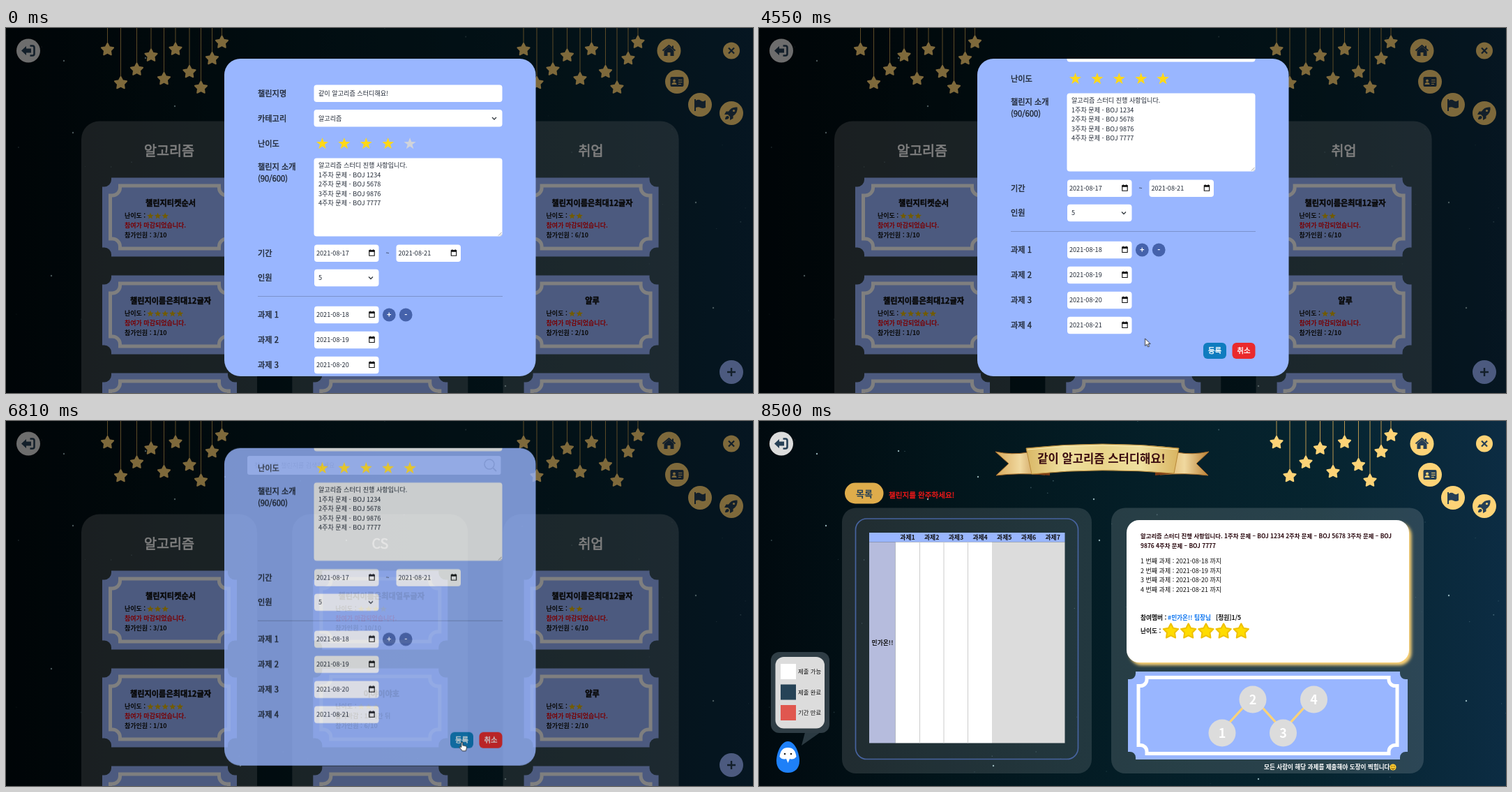
Recreate the animation shown at these times as an HTML page. Size 1071 by 523 pixels, loop 8570 ms.

```html
<!DOCTYPE html>
<html lang="ko">
<head>
<meta charset="utf-8">
<title>챌린지</title>
<style>
html, body { margin: 0; width: 100%; height: 100%; overflow: hidden; background: #000; }
svg { display: block; width: 1071px; height: 523px; }
text { font-family: "Noto Sans CJK KR", "Noto Sans CJK", "Noto Sans", sans-serif; white-space: pre; }
.b { font-weight: 700; }
.h { font-weight: 700; stroke: #111; stroke-width: .035em; }
.m { stroke: currentColor; stroke-width: .035em; }
.mid { text-anchor: middle; }
</style>
</head>
<body>
<svg id="stage" viewBox="0 0 1071 523"></svg>
<script>
const LOOP = 8570;
const GOLD = '#fdd377', NAVY = '#263f55', BLUE = '#99b6ff', GREY = '#dcdcdc';

// Drawing helpers
const times = (n, f) => Array.from({ length: n }, (_, i) => f(i)).join('');
const rect = (x, y, w, h, fill, rx = 0, more = '') =>
  `<rect x="${x}" y="${y}" width="${w}" height="${h}" rx="${rx}" fill="${fill}" ${more}/>`;
const dot = (x, y, r, fill, more = '') => `<circle cx="${x}" cy="${y}" r="${r}" fill="${fill}" ${more}/>`;
const path = (d, fill, more = '') => `<path d="${d}" fill="${fill}" ${more}/>`;
const line = (d, color, w, more = '') => path(d, 'none', `stroke="${color}" stroke-width="${w}" ${more}`);
const at = (x, y, body) => `<g transform="translate(${x} ${y})">${body}</g>`;
// y is the visual middle of the line
const text = (x, y, size, str, fill = '#111', cls = '') =>
  `<text x="${x}" y="${(y + size * 0.36).toFixed(2)}" font-size="${size}" fill="${fill}" color="${fill}" class="${cls}">${str}</text>`;

function star(x, y, r, fill, ratio = 0.4, more = '') {
  const pts = times(10, i => {
    const a = (i / 5 - 0.5) * Math.PI, d = i % 2 ? r * ratio : r;
    return `${(x + d * Math.cos(a)).toFixed(2)},${(y + d * Math.sin(a)).toFixed(2)} `;
  });
  return `<polygon points="${pts}" fill="${fill}" ${more}/>`;
}
const softStar = (x, y, r, fill, edge = fill) =>
  star(x, y, r, fill, 0.52, `stroke="${edge}" stroke-width="2" stroke-linejoin="round"`);

// Rectangle with stepped, concave corners
function notched(x, y, w, h, r, s) {
  const q = r - s, arc = (dx, dy) => `a${q} ${q} 0 0 0 ${dx} ${dy}`;
  return `M${x + r} ${y}H${x + w - r}v${s}${arc(q, q)}h${s}V${y + h - r}h${-s}${arc(-q, q)}v${s}` +
    `H${x + r}v${-s}${arc(-q, -q)}h${-s}V${y + r}h${s}${arc(q, -q)}Z`;
}
const ticket = (x, y, w, h, dx, dy, r) =>
  path(notched(x, y, w, h, r, 3), BLUE) +
  line(notched(x + dx, y + dy, w - 2 * dx, h - 2 * dy, r + 1, 3), '#fff', 5);

// Shared scenery
function sky() {
  let seed = 11;
  const rnd = () => (seed = seed * 16807 % 2147483647) / 2147483647;
  const faint = times(70, () => dot((rnd() * 1071).toFixed(1), (rnd() * 523).toFixed(1),
    (0.4 + rnd() * 0.6).toFixed(2), '#9fc4cc', `opacity="${(0.1 + rnd() * 0.3).toFixed(2)}"`));
  const bright = [[96, 150], [242, 112], [65, 355], [83, 47], [314, 80], [488, 171], [480, 112], [989, 250],
    [1014, 401], [716, 513], [336, 494], [200, 43]]
    .map(([x, y]) => dot(x, y, 1.2, '#bfe0e6', 'opacity=".75"')).join('');
  return rect(0, 0, 1071, 523, 'url(#sky)') + faint + bright;
}
const hanging = x0 => [[0, 31], [19, 79], [42, 59.5], [62.5, 39.5], [81, 73], [97.5, 30.5], [117.5, 63], [134, 85.5],
  [150, 44], [164, 20.5]].map(([dx, y]) =>
  line(`M${x0 + dx} 0V${y - 8}`, '#b8954f', 1) + softStar(x0 + dx, y, 9, GOLD)).join('');

const icons = {
  exit: path('M-10 0L-3-6.500V-3H4V3H-3V6.500Z', NAVY) + line('M2.500-7H6q2.500 0 2.500 2.500V4.500q0 2.500-2.500 2.500H2.500', NAVY, 2.6),
  home: path('M-7 0L0-6 7 0V7.500H2V2.500H-2V7.500H-7Z', NAVY) + line('M-9 0L0-7.500 9 0M5.500-7V-3', NAVY, 2),
  card: rect(-9.5, -7, 19, 14, NAVY, 2) + dot(-4, -1.5, 2, GOLD) + path('M-7.500 4q0-3 3.500-3t3.500 3z', GOLD) +
    line('M2-2.500H7.500M2 .5H7.500M2 3.500H6', GOLD, 1.2),
  flag: line('M-7-8V9', NAVY, 2) + path('M-6-6q4-2.500 7 0t7-.5V4q-4 2-7 .3T-6 4Z', NAVY),
  rocket: path('M8.500-8.500q1 8-6 12.500V7.500L-2 10V5L-5 2H-10L-7.500-2.500H-4Q0-9.500 8.500-8.500Z', NAVY) +
    path('M-6 4q3 0 2.500 3-1.500 2.500-5.500 2 0-4 3-5Z', NAVY) + dot(3.5, -3.5, 1.6, GOLD)
};
const nav = () =>
  at(32, 32.5, dot(0, 0, 17, GREY) + icons.exit) +
  at(950.5, 32.5, dot(0, 0, 17, GOLD) + icons.home) +
  at(962, 77, dot(0, 0, 17, GOLD) + icons.card) +
  at(995, 110, dot(0, 0, 17, GOLD) + icons.flag) +
  at(1040, 122, dot(0, 0, 17, GOLD) + icons.rocket) +
  at(1040, 32.5, dot(0, 0, 12, GOLD) + line('M-4-4L4 4M4-4L-4 4', NAVY, 2.2));

// Challenge list
const CLOSED = '참여가 마감되었습니다.';
const columns = [
  ['알고리즘', ['챌린지티켓순서', 3, CLOSED, '3/10'], ['챌린지이름은최대12글자', 5, CLOSED, '1/10']],
  ['CS', ['챌린지이름은최대열두글자', 4, CLOSED, '10/10'], ['이야이야호', 3, '참가마감 : 18시간 뒤', '6/10']],
  ['취업', ['챌린지이름은최대12글자', 2, CLOSED, '6/10'], ['얄루', 2, CLOSED, '2/10']]
];
function listTicket([name, level, state, people], x, y) {
  return text(x + 128, y + 36, 11.2, name, '#111', 'h mid') +
    text(x + 62, y + 54.5, 9, '난이도 :', '#111', 'b') +
    times(level, i => star(x + 99 + i * 10.6, y + 55, 5, '#e6b800', 0.42)) +
    text(x + 62, y + 68.5, 9, state, state === CLOSED ? '#f00008' : '#111', 'b') +
    text(x + 62, y + 82, 9, '참가인원 : ' + people, '#111', 'b');
}
const listPage = () => sky() + hanging(145.5) + hanging(742) + nav() +
  rect(346, 50, 363.5, 27, '#fff', 3) + text(356, 63.5, 9, '찾고 싶은 챌린지를 검색하세요', '#999') +
  line('M698.500 67.500L703 72', '#555', 2) + dot(693, 62, 7, 'none', 'stroke="#555" stroke-width="1.600"') +
  columns.map(([title, ...cards], c) => {
    const x = 108 + c * 302.3;
    return rect(x, 133.5, 252, 420, '#fff', 26, 'opacity=".2"') +
      text(x + 126, 176, 19.6, title, '#fff', 'm mid') +
      times(3, i => ticket(x + 30, 214.5 + i * 140, 193, 113, 11.5, 11.5, 13)) +
      cards.map((card, i) => listTicket(card, x, 214.5 + i * 140)).join('');
  }).join('') +
  at(1040, 493, dot(0, 0, 17, BLUE) + line('M-6 0H6M0-6V6', NAVY, 2.4));

// Challenge detail
const MEMBER = '민가온!!';
const ribbon = () =>
  path('M339 44Q362 49 386 45L410 77Q372 74 340 78L358 61Z', 'url(#tail)', 'stroke="#a9702c"') +
  path('M645 44Q622 49 599 45L575 77Q612 74 644 78L627 61Z', 'url(#tail)', 'stroke="#a9702c"') +
  path('M391 76L417 73 417 78Z M595 75L568 73 568 78Z', '#7d3c16') +
  path('M383 39Q492 27 602 39L595 75Q492 66 391 76Z', 'url(#gold)', 'stroke="#b98a3a"') +
  line('M385 41Q492 29 600 41', '#f6e8ae', 1) +
  text(491, 54, 16.6, '같이 알고리즘 스터디해요!', '#3a0b10', 'b mid');

const board = () =>
  rect(119, 124.5, 358, 380.5, '#fff', 20, 'opacity=".12"') +
  rect(138.5, 140, 319, 344.5, 'none', 16, 'stroke="#47639f" stroke-width="1.700"') +
  rect(158, 160, 280.5, 13.5, BLUE) + rect(158, 173.5, 37.5, 288, '#b6bcdd') +
  rect(195.5, 173.5, 138.5, 288, '#fff') + rect(334, 173.5, 104.5, 288, GREY) +
  line('M230.500 173.500V461.500M265 173.500V461.500M299.500 173.500V461.500', '#ccc', 1) +
  times(7, i => text(213 + i * 34.7, 166.5, 8.8, '과제' + (i + 1), '#111', 'b mid')) +
  text(177, 318, 8.8, MEMBER, '#111', 'b mid');

const legend = () =>
  path('M66 446H88L61 465Z', '#2b3a42') + rect(17, 331, 84, 116, '#2f3d45', 12) +
  rect(23.5, 338, 70.5, 102.5, GREY, 12) +
  [['#fff', '제출 가능'], ['#264357', '제출 완료'], ['#e0574f', '기간 만료']].map(([c, s], i) =>
    rect(31, 348 + i * 29.5, 22, 22, c) + text(56, 359 + i * 29.5, 8.4, s)).join('') +
  path('M41.500 459C52 459 58 477 58 487C58 498 51 504 41.500 504S25 498 25 487C25 477 31 459 41.500 459Z', '#1e80f8') +
  path('M29.500 481Q31 468 41.500 468T53.500 481Q50 486 44 484L41.500 490 39 484Q33 486 29.500 481Z', '#fff') +
  dot(37, 477, 1.3, '#222') + dot(46, 477, 1.3, '#222');

const steps = [[664, 447], [708, 399], [751.5, 447], [795.5, 399]];
const detail = () =>
  rect(505, 124.5, 448, 380.5, '#fff', 20, 'opacity=".14"') +
  rect(531, 146, 404.5, 204, GOLD, 18, 'filter="url(#blur)"') + rect(527, 142, 405, 204, '#fff', 18) +
  text(547, 165, 8.4, '알고리즘 스터디 진행 사항입니다. 1주차 문제 – BOJ 1234 2주차 문제 – BOJ 5678 3주차 문제 – BOJ', '#2b0a10', 'b') +
  text(547, 178.5, 8.4, '9876 4주차 문제 – BOJ 7777', '#2b0a10', 'b') +
  times(4, i => text(547, 201 + i * 13.5, 9, `${i + 1} 번째 과제 : 2021-08-${18 + i} 까지`)) +
  text(547, 282, 8.7, '참여멤버 :', '#111', 'b') + text(586, 282, 8.7, `#${MEMBER} 팀장님`, '#0b74f0', 'b') +
  text(655, 282, 8.7, '[정원]1/5', '#111', 'b') + text(547, 300.5, 8.7, '난이도 :', '#111', 'b') +
  times(5, i => softStar(590.5 + i * 25.2, 301.5, 11.2, '#ffdc00', '#efc100')) +
  ticket(529, 359, 401, 126, 15, 8.5, 11) +
  line('M' + steps.map(([x, y]) => `${x} ${y - 3.5}`).join('L'), GOLD, 3.2) +
  steps.map(([x, y], i) => dot(x, y, 19.5, GREY) + text(x, y + 0.5, 18, i + 1, '#fff', 'b mid')).join('') +
  text(724, 496, 8.6, '모든 사람이 해당 과제를 제출해야 도장이 찍힙니다', '#fff', 'b') +
  dot(909, 496, 4.6, '#fbc92f') + line('M906.500 497.500q2.500 3 5 0', '#5a3a08', 1) +
  dot(907.4, 494.7, 0.7, '#5a3a08') + dot(910.6, 494.7, 0.7, '#5a3a08');

const detailPage = () => sky() + hanging(742) + nav() + ribbon() +
  rect(123, 88.5, 55.5, 30, '#dfac4b', 15) + text(151, 104, 13, '목록', NAVY, 'b mid') +
  `<g id="notice">${text(186, 106.5, 10.6, '챌린지를 완주하세요!', '#f81818', 'm')}</g>` +
  board() + legend() + detail();

// Form dialog
const INK = '#212936';
const label = (y, s) => text(361, y, 11.2, s, INK, 'm');
const field = (x, y, w, h = 24.5) => rect(x, y, w, h, '#fff', 4);
const value = (x, y, s) => text(x, y, 9.1, s, INK);
const chevron = (x, y) => line(`M${x - 3} ${y - 1.5}l3 3 3-3`, '#343a40', 1.3);
const date = (x, y, s) => field(x, y - 12.2, 92.5) + value(x + 3, y, s) +
  at(x + 82.5, y - 0.5, line('M-3.700-3.500H3.700V4H-3.700Z', '#111', 1.1) + rect(-4, -4, 8, 2.6, '#111') +
    line('M-2.200-5V-3M2.200-5V-3', '#111', 1.1));
const roundButton = (x, s) => dot(x, 411, 9.4, '#4562ab') + text(x, 410.7, 11, s, '#fff', 'b mid');
const button = (x, s, fill) => rect(x, 544, 33, 23, fill, 6) + text(x + 16.5, 555.5, 10.4, s, '#fff', 'm mid');

const form = () =>
  label(94, '챌린지명') + field(441.5, 81.5, 270) + value(448, 94, '같이 알고리즘 스터디해요!') +
  label(129.5, '카테고리') + field(441.5, 117, 270) + value(448, 129.5, '알고리즘') + chevron(700, 129.5) +
  label(166, '난이도') +
  times(5, i => star(453.5 + i * 31.4, 166, 9, i < 4 ? '#ffd817' : '#d0d3da')) +
  `<g id="fifth">${star(579.1, 166, 9.2, '#ffd817')}</g>` +
  label(199, '챌린지 소개') + label(216, '(90/600)') + field(441.5, 186.5, 270, 112) +
  value(448, 197, '알고리즘 스터디 진행 사항입니다.') +
  ['1234', '5678', '9876', '7777'].map((n, i) => value(448, 210.5 + i * 13.4, `${i + 1}주차 문제 - BOJ ${n}`)).join('') +
  line('M706 297.500l4.500-4.500M709 297.500l1.500-1.500', '#777', 0.7) +
  label(322.5, '기간') + date(442, 322.7, '2021-08-17') + value(544.5, 323, '~') + date(559.5, 322.7, '2021-08-21') +
  label(358, '인원') + field(442, 345.7, 92.5) + value(448, 358, '5') + chevron(523, 358) +
  line('M361 384.500H712', '#7b92cc', 1) +
  times(4, i => label(411 + i * 36, '과제 ' + (i + 1)) + date(442, 411 + i * 36, `2021-08-${18 + i}`)) +
  roundButton(549.3, '+') + roundButton(573.2, '-') +
  button(637, '등록', '#0f7cbf') + button(678.5, '취소', '#ea2a2c');

const cursor = () =>
  `<g id="arrow">${path('M0 0V10.500L2.500 8.300 4.200 12 5.900 11.200 4.300 7.600H7.500Z', '#fff', 'stroke="#222" stroke-width=".9"')}</g>` +
  `<g id="hand">${path('M-1 1q1-1.500 2 0V5l4.500 1q1.500.500 1.300 2.500L5.500 13H.5L-3.500 8q0-1.800 1.500-1L-1 8Z', '#fff', 'stroke="#222" stroke-width=".9"')}</g>`;

const gradient = (id, stops) => `<linearGradient id="${id}">` +
  stops.map((c, i) => `<stop offset="${i / (stops.length - 1)}" stop-color="${c}"/>`).join('') + '</linearGradient>';

document.getElementById('stage').innerHTML = '<defs>' +
  gradient('sky', ['#010a0f', '#02151b', '#041e27', '#06242f', '#0c2c43']) +
  gradient('gold', ['#d9b765', '#efe0a0', '#e9d48a', '#efe0a0', '#d9b460']) +
  gradient('tail', ['#d9a95a', '#f0d9a0', '#b98035']) +
  '<filter id="blur"><feGaussianBlur stdDeviation="2"/></filter>' +
  '<clipPath id="box"><rect x="313" y="44" width="446.500" height="455" rx="23"/></clipPath></defs>' +
  `<g id="list">${listPage()}</g><g id="detail">${detailPage()}</g>` +
  rect(0, 0, 1071, 523, '#000', 0, 'id="shade"') +
  `<g id="modal">${rect(313, 44, 446.5, 455, BLUE, 23)}<g clip-path="url(#box)"><g id="scroll">${form()}</g></g></g>` +
  `<g id="cursor">${cursor()}</g>`;

// Motion: keyframes given in milliseconds
const sheet = document.head.appendChild(document.createElement('style'));
function animate(id, frames, timing = 'linear') {
  const all = [[0, frames[0][1]], ...frames, [LOOP, frames[frames.length - 1][1]]];
  const body = all.map(([ms, css]) => `${(ms / LOOP * 100).toFixed(3)}%{${css}}`).join('');
  sheet.textContent += `@keyframes ${id}{${body}}#${id}{animation:${id} ${LOOP}ms ${timing} infinite}`;
}
const toggle = (id, first, ...switches) => animate(id,
  [0, ...switches].map((ms, i) => [ms, `opacity:${(i + first) % 2}`]), 'step-end');
const move = (x, y) => `transform:translate(${x}px,${y}px)`;

toggle('detail', 0, 6940);
toggle('notice', 0, 7900);
toggle('fifth', 0, 2830);
toggle('hand', 0, 1450, 1850, 2550, 3200, 6280, 6900);
toggle('arrow', 1, 1450, 1850, 2550, 3200, 6280, 6900, 7300);
animate('shade', [[7000, 'opacity:.5'], [7150, 'opacity:0']]);
animate('modal', [
  [6780, 'opacity:1;' + move(0, 0)],
  [6810, 'opacity:.8;' + move(0, -5)],
  [6930, 'opacity:0;' + move(0, -35)]
]);
animate('scroll', [
  [4000, move(0, 0)], [4210, move(0, -93)],
  [5020, move(0, -93)], [5230, move(0, 0)],
  [5900, move(0, 0)], [6100, move(0, -93)]
]);
animate('cursor', [
  [830, 1090, 540], [900, 1045, 505], [1100, 850, 350], [1300, 600, 180], [1400, 510, 135], [1580, 540, 159],
  [1720, 541, 160], [1790, 537, 155], [2000, 530, 104], [2300, 534, 128], [2630, 560, 162], [2700, 564, 161],
  [2830, 576, 162], [2970, 577, 161], [3110, 576, 162], [3400, 562, 265], [3700, 514, 440], [3850, 511, 469],
  [3930, 515, 466], [4250, 515, 466], [4750, 579, 431], [5300, 579, 431], [5700, 644, 443], [6240, 644, 443],
  [6590, 653, 459], [6900, 654, 460]
].map(([ms, x, y]) => [ms, move(x, y)]));
</script>
</body>
</html>
```
